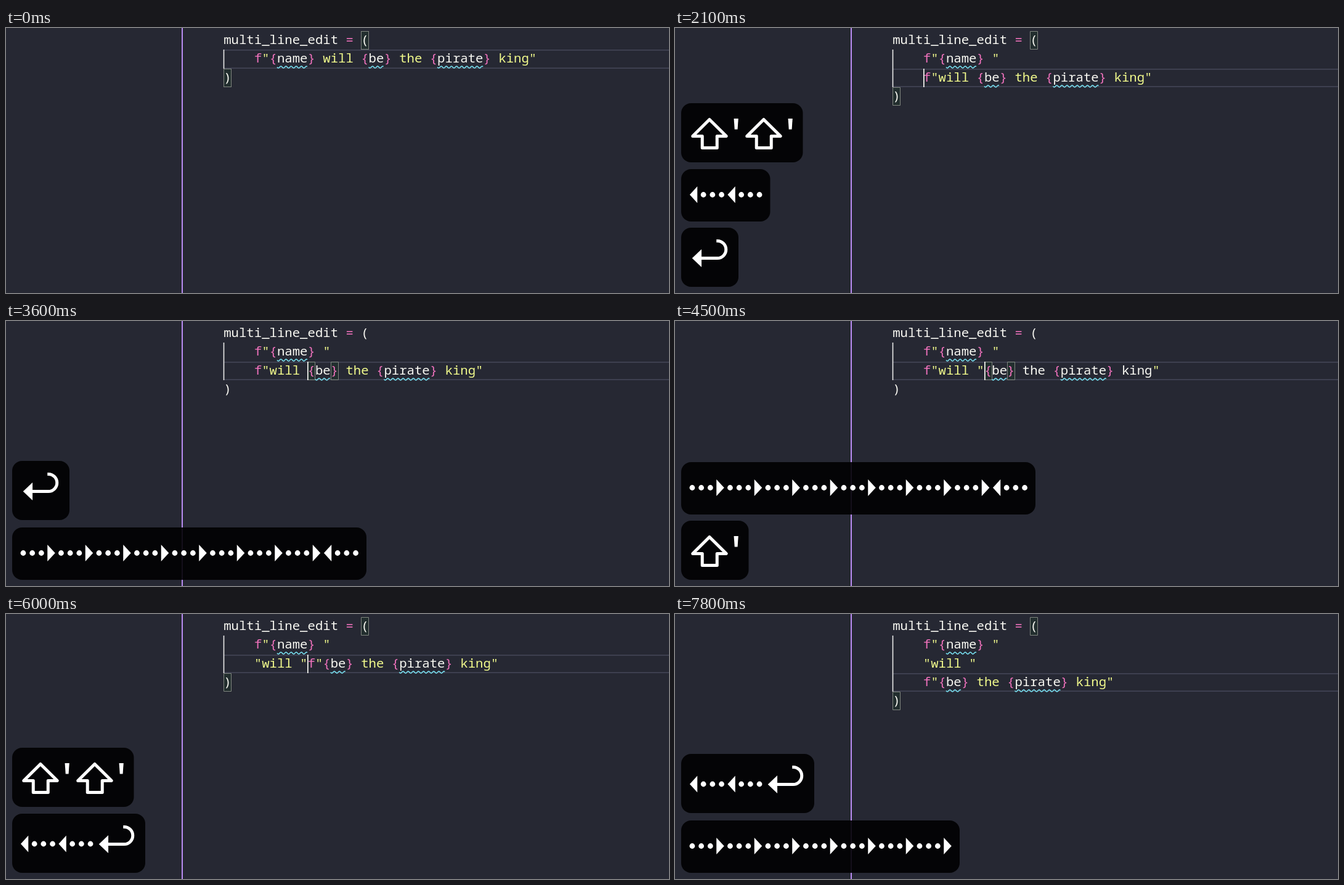
Write an HTML page with a canvas that moves like this. It is 1076 px wide and 430 px high and loops after 8000 ms.

```html
<!DOCTYPE html>
<html lang="en">
<head>
<meta charset="utf-8">
<title>Splitting a string</title>
<style>
  html, body { margin: 0; width: 100%; height: 100%; overflow: hidden; background: #262833; }
  canvas { display: block; }
</style>
</head>
<body>
<canvas id="stage" width="1076" height="430"></canvas>
<script>
const ctx = document.getElementById('stage').getContext('2d');
const LOOP = 8000, LEFT = 353.2, CELL = 12.39;
const WHITE = '#f8f8f2', PINK = '#f072bd', YELLOW = '#f1fa8c', CYAN = '#76dcec';

const colX = col => LEFT + col * CELL;
const rowY = row => Math.round(5 + row * 30.3);

// A held key: one press, a pause, then quick repeats.
const hold = (start, n) =>
  Array.from({ length: n }, (_, i) => i ? start + 280 + (i - 1) * 40 : start);
const rightsA = hold(2650, 8), rightsB = hold(6800, 7);

// Editor steps: time, cursor row, cursor column, lines inside the parentheses.
const head = 'f"{name} ', rest = '{be} the {pirate} king"';
const steps = [];
let body;
function step(t, row, col, lines = body) {
  body = lines;
  steps.push({ t, row, col, lines });
}
step(-550, 1, 13, [head + 'will ' + rest]);
step(80, 1, 14, [head + '"will ' + rest]);
step(380, 1, 15, [head + '""will ' + rest]);
step(490, 1, 16, [head + '"f"will ' + rest]);
step(880, 1, 15);
step(1080, 1, 14);
step(1980, 2, 4, [head + '"', 'f"will ' + rest]);
rightsA.forEach((t, i) => step(t, 2, 5 + i));
step(3480, 2, 11);
step(4480, 2, 12, [head + '"', 'f"will "' + rest]);
step(4790, 2, 13, [head + '"', 'f"will ""' + rest]);
step(5290, 2, 13, [head + '"', '"will "f"' + rest]);
step(5390, 2, 12);
step(5590, 2, 11);
step(6090, 3, 4, [head + '"', '"will "', 'f"' + rest]);
rightsB.forEach((t, i) => step(t, 3, 5 + i));

// Key panels: each key is [kind, time].
const panels = [
  [['S', 80], ['S', 380]],
  [['L', 880], ['L', 1080]],
  [['E', 1980]],
  [...rightsA.map(t => ['R', t]), ['L', 3480]],
  [['S', 4480], ['S', 4690]],
  [['L', 5390], ['L', 5590], ['E', 5980]],
  rightsB.map(t => ['R', t])
];
const keyWidth = { L: 61.5, R: 61.5, S: 88, E: 71.5 };

function squiggle(from, to, y) {
  ctx.strokeStyle = CYAN;
  ctx.lineWidth = 1.6;
  ctx.beginPath();
  for (let x = colX(from); x <= colX(to); x++)
    ctx.lineTo(x, y + 1.5 * Math.sin((x - colX(from)) * 2 * Math.PI / 8.3));
  ctx.stroke();
}

function codeLine(text, row) {
  const y = rowY(row);
  let quoted = false, format = false, open = -1;
  for (let i = 0; i < text.length; i++) {
    const c = text[i], live = !quoted || format;
    let color = quoted ? YELLOW : WHITE;
    if (c === '"') {
      format = !quoted && text[i - 1] === 'f';
      quoted = !quoted;
      color = YELLOW;
    } else if (!quoted && (c === '=' || c === 'f' && text[i + 1] === '"')) {
      color = PINK;
    } else if (live && c === '{') {
      color = PINK;
      open = i;
    } else if (live && c === '}') {
      color = PINK;
      squiggle(open + 1, i, y + 28.5);
      open = -1;
    } else if (open >= 0) {
      color = WHITE;
    }
    ctx.fillStyle = color;
    ctx.fillText(c, colX(i), y + 21);
  }
}

function bracketBox(row, col) {
  const x = Math.round(colX(col)), y = rowY(row);
  ctx.fillStyle = 'rgba(0,100,0,.1)';
  ctx.fillRect(x, y, 13, 30);
  ctx.strokeStyle = '#80867f';
  ctx.lineWidth = 1;
  ctx.strokeRect(x + .5, y + .5, 12, 29);
}

function matchBrackets(lines, row, col) {
  for (const m of lines[row].matchAll(/\{\w+\}/g)) {
    const end = m.index + m[0].length;
    if (col >= m.index && col <= end) {
      bracketBox(row, m.index);
      bracketBox(row, end - 1);
      return;
    }
  }
  bracketBox(0, 18);
  bracketBox(lines.length - 1, 0);
}

function editor(t) {
  const { t: moved, row, col, lines: inner } = steps.filter(s => s.t <= t).pop();
  const lines = ['multi_line_edit = (', ...inner.map(s => '    ' + s), ')'];

  ctx.fillStyle = '#b98df3';
  ctx.fillRect(285, 0, 2, 430);
  ctx.fillStyle = '#424455';
  ctx.fillRect(354, rowY(row), 722, 1.7);
  ctx.fillRect(354, rowY(row + 1) - 1.7, 722, 1.7);
  ctx.fillStyle = '#ececea';
  ctx.fillRect(352.7, 35, 1.6, rowY(lines.length - 1) - 35);

  matchBrackets(lines, row, col);
  ctx.font = '20.65px "Noto Sans Mono", "DejaVu Sans Mono", monospace';
  lines.forEach(codeLine);

  if (Math.floor((t - moved) / 500) % 2 === 0) {
    ctx.fillStyle = WHITE;
    ctx.fillRect(Math.round(colX(col)), rowY(row), 1.7, 30);
  }
}

function shape(points) {
  ctx.beginPath();
  points.forEach(([x, y]) => ctx.lineTo(x, y));
  ctx.closePath();
}

function dots(x, y) {
  for (let i = 0; i < 3; i++) {
    ctx.beginPath();
    ctx.arc(x + i * 14.7, y, 4.4, 0, 7);
    ctx.fill();
  }
}

// Icons take the left edge of their slot, the panel top and the arrow centre line.
const icons = {
  L(x, y, mid) {
    shape([[x + 3.2, mid], [x + 15.5, mid - 13.5], [x + 15.5, mid + 13.5]]);
    ctx.fill();
    dots(x + 25.4, mid);
  },
  R(x, y, mid) {
    dots(x + 7.2, mid);
    shape([[x + 59, mid], [x + 46.5, mid - 13.5], [x + 46.5, mid + 13.5]]);
    ctx.fill();
  },
  S(x, y) {
    shape([[35.2, 26.5], [62.5, 53.5], [47.5, 53.5], [47.5, 72.5],
           [23.5, 72.5], [23.5, 53.5], [8, 53.5]].map(([a, b]) => [x + a, y + b]));
    ctx.stroke();
    shape([[74.8, 25], [82, 25], [80.8, 42.5], [76, 42.5]].map(([a, b]) => [x + a, y + b]));
    ctx.fill();
  },
  E(x, y) {
    shape([[7, 49.5], [22.3, 35], [22.3, 64]].map(([a, b]) => [x + a, y + b]));
    ctx.fill();
    ctx.beginPath();
    ctx.moveTo(x + 21, y + 49.5);
    ctx.lineTo(x + 48, y + 49.5);
    ctx.arc(x + 48, y + 35.5, 14, Math.PI / 2, -Math.PI / 2, true);
    ctx.lineTo(x + 46.5, y + 21.5);
    ctx.stroke();
  }
};

function drawPanel(keys, y, h) {
  const width = keys.reduce((sum, [k]) => sum + keyWidth[k], 21.5);
  ctx.fillStyle = 'rgba(0,0,0,.89)';
  ctx.beginPath();
  ctx.roundRect(10, y, width, h, 16);
  ctx.fill();
  ctx.fillStyle = ctx.strokeStyle = '#fff';
  ctx.lineWidth = 5;
  ctx.lineJoin = 'round';
  let x = 20.75;
  for (const [k] of keys) {
    icons[k](x, y, y + (h > 90 ? 49 : 41.5));
    x += keyWidth[k];
  }
}

// Newest panel at the bottom; each one fades two seconds after its last key.
function keyPanels(t) {
  let top = 420, below = 0;
  for (const panel of [...panels].reverse()) {
    const keys = panel.filter(k => k[1] <= t);
    if (!keys.length) continue;
    const alpha = Math.min(1, 1 - (t - keys.at(-1)[1] - 2000) / 200);
    if (alpha <= 0) continue;
    const tall = keys.some(([k]) => k === 'S' || k === 'E');
    const h = tall ? 96 : 85;
    const gap = !below ? 0 : !tall ? 10 : below > 3 ? 12 : 11;
    top -= gap + h;
    below = keys.length;
    ctx.globalAlpha = alpha;
    drawPanel(keys, top, h);
  }
  ctx.globalAlpha = 1;
}

function draw() {
  const t = performance.now() % LOOP;
  ctx.fillStyle = '#262833';
  ctx.fillRect(0, 0, 1076, 430);
  editor(t);
  keyPanels(t);
  requestAnimationFrame(draw);
}
draw();
</script>
</body>
</html>
```
